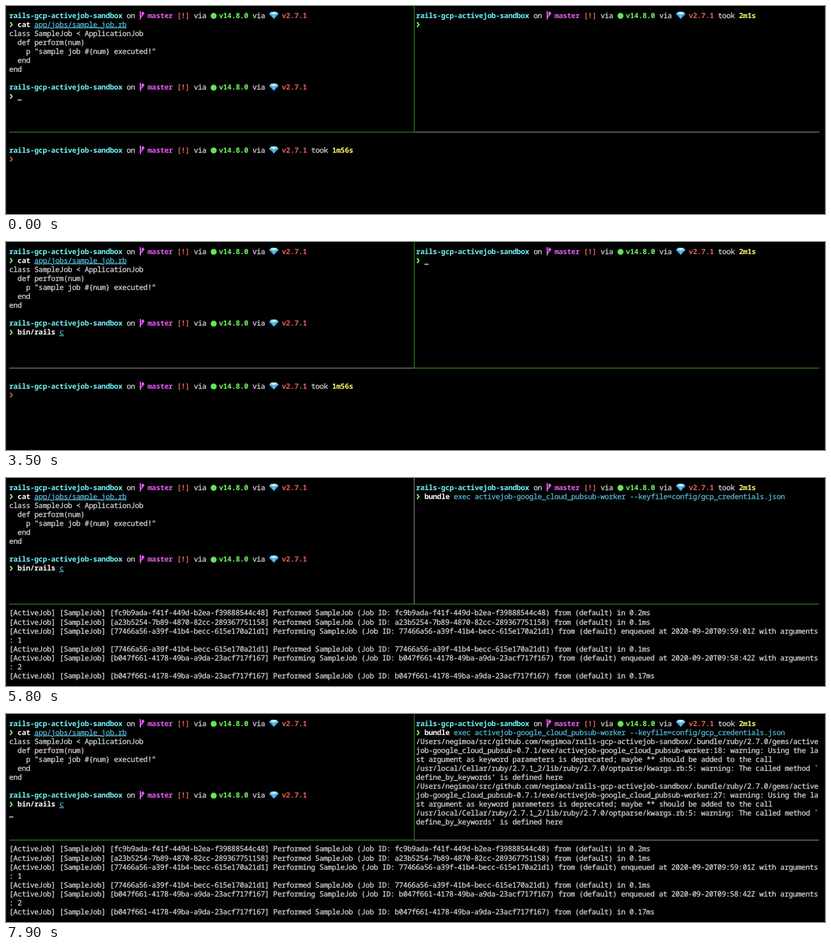
Animation, 1280 px wide and 326 px high, one loop 8000 ms. Source, as an HTML page:

```html
<!DOCTYPE html>
<html lang="en">
<head>
<meta charset="utf-8">
<title>Terminal panes</title>
<style>
  html, body { margin: 0; width: 100%; height: 100%; overflow: hidden; background: #000; }
  svg { display: block; width: 100%; height: 100%; }
  text {
    font: 11.4px "Noto Sans Mono", "DejaVu Sans Mono", monospace;
    letter-spacing: calc(6.555px - .6em);
    color: #d4d4d4;
    fill: currentColor;
    stroke: currentColor;
    stroke-width: .3px;
    white-space: pre;
    text-rendering: geometricPrecision;
  }
  .b { font-weight: 700; stroke: none; }
  .u { text-decoration: underline; }
  .white { color: #fff; }
  .aqua { color: #74f5fa; }
  .teal { color: #55bad6; }
  .pink { color: #e65cf2; }
  .red { color: #e65f5a; }
  .green { color: #6cf45f; }
  .yellow { color: #fbf86a; }
</style>
</head>
<body>
<svg id="stage" viewBox="0 0 1280 326" preserveAspectRatio="none"></svg>
<script>
const LOOP = 8000;
const CELL_W = 6.555, CELL_H = 14.06, LEFT = 5, BASE = 18.6;
const RIGHT_COL = 97, BOTTOM_ROW = 14;
const stage = document.getElementById('stage');
const colX = c => LEFT + c * CELL_W;
const rowY = r => BASE + r * CELL_H;

function add(tag, attrs, parent = stage) {
  const el = document.createElementNS('http://www.w3.org/2000/svg', tag);
  for (const k in attrs) el.setAttribute(k, attrs[k]);
  return parent.appendChild(el);
}

function write(col, row, str, cls = '', parent = stage) {
  const el = add('text', { x: colX(col), y: rowY(row), class: cls }, parent);
  el.textContent = str;
  return el;
}

function writeLines(col, row, lines, parent) {
  lines.forEach((line, i) => {
    const str = line.trimStart();
    if (str) write(col + line.length - str.length, row + i, str, '', parent);
  });
}

function chevron(col, row, color, parent) {
  const x = colX(col) + 1.6, y = rowY(row) - 3.5;
  add('path', { d: `M${x} ${y - 3.8}l2.9 3.8l-2.9 3.8`, fill: 'none', stroke: color, 'stroke-width': 2 }, parent);
}

function branch(col, row, parent) {
  const x = colX(col), y = rowY(row);
  add('path', {
    d: `M${x + 1.8} ${y - 10.5}v13M${x + 5.7} ${y - 8.5}v3.6l-3.6 3.6M${x + 3.7} ${y - 6}l2-2.8l2 2.8`,
    fill: 'none', stroke: '#e65cf2', 'stroke-width': 1.9
  }, parent);
}

function gem(col, row, parent) {
  const g = add('g', { transform: `translate(${colX(col)} ${rowY(row) - 9.3})` }, parent);
  const facet = (points, fill) => add('polygon', { points, fill }, g);
  facet('3,0 11.5,0 14.4,3.8 7.2,11 0,3.8', '#3f9fdc');
  facet('3,0 11.5,0 14.4,3.8 0,3.8', '#8fd3f3');
  facet('5.4,0 9,0 10,3.8 4.4,3.8', '#c9ecfb');
  facet('4.4,3.8 10,3.8 7.2,11', '#62bdec');
}

function prompt(col, row, took, mark = '#7df56c', parent = stage) {
  const put = (c, str, cls) => write(col + c, row, str, cls, parent);
  put(0, 'rails-gcp-activejob-sandbox', 'b aqua');
  put(28, 'on');
  branch(col + 31, row, parent);
  put(33, 'master', 'b pink');
  put(40, '[!]', 'b red');
  put(44, 'via');
  add('circle', { cx: colX(col + 48) + 4.9, cy: rowY(row) - 3.1, r: 4.7, fill: '#62e556' }, parent);
  put(50, 'v14.8.0', 'b green');
  put(58, 'via');
  gem(col + 62, row, parent);
  put(65, 'v2.7.1', 'b red');
  if (took) {
    put(72, 'took');
    put(77, took, 'b yellow');
  }
  chevron(col, row + 1, mark, parent);
}

// A command line made of styled runs; returns a setter for the number of typed characters.
function command(col, row, runs) {
  let at = 0;
  const parts = runs.map(([str, cls]) => {
    const part = { str, at, el: write(col + at, row, '', cls) };
    at += str.length + 1;
    return part;
  });
  const type = n => parts.forEach(p => {
    const shown = p.str.slice(0, Math.max(0, n - p.at));
    if (p.el.textContent !== shown) p.el.textContent = shown;
  });
  return { type, length: at - 1 };
}

// Window edges and pane borders
for (const x of [0, 1279]) add('rect', { x, y: 0, width: 1, height: 326, fill: '#14142c' });
const border = (x, y, width, height) => add('rect', { x, y, width, height });
const vLine = border(637.5, 0, 1.2, 197);
const hLeft = border(5, 197, 633, 1.2);
const hRight = border(638, 197, 633, 1.2);

// Left pane
prompt(0, 0);
command(2, 1, [['cat', 'b white'], ['app/jobs/sample_job.rb', 'teal u']]).type(99);
writeLines(0, 2, [
  'class SampleJob < ApplicationJob',
  '  def perform(num)',
  '    p "sample job #{num} executed!"',
  '  end',
  'end'
]);
prompt(0, 8);
const consoleCmd = command(2, 9, [['bin/rails', 'b white'], ['c', 'teal u']]);

// Right pane
prompt(RIGHT_COL, 0, '2m1s');
const workerCmd = command(RIGHT_COL + 2, 1, [
  ['bundle', 'b white'],
  ['exec activejob-google_cloud_pubsub-worker --keyfile=config/gcp_credentials.json', 'teal']
]);
const warnings = add('g', {});
const warning = line => [
  '/Users/negimoa/src/github.com/negimoa/rails-gcp-activejob-sandbox/.bundle/ruby/2.7.0/gems/active',
  `job-google_cloud_pubsub-0.7.1/exe/activejob-google_cloud_pubsub-worker:${line}: warning: Using the la`,
  'st argument as keyword parameters is deprecated; maybe ** should be added to the call',
  '/usr/local/Cellar/ruby/2.7.1_2/lib/ruby/2.7.0/optparse/kwargs.rb:5: warning: The called method `',
  "define_by_keywords' is defined here"
];
writeLines(RIGHT_COL, 2, [...warning(18), ...warning(27)], warnings);

// Bottom pane
const shell = add('g', {});
prompt(0, BOTTOM_ROW + 1, '1m56s', '#e0503f', shell);
const log = add('g', {});
const entry = (verb, id, tail) =>
  `[ActiveJob] [SampleJob] [${id}] ${verb} SampleJob (Job ID: ${id}) from (default) ${tail}`;
const done = (id, ms) => entry('Performed', id, `in ${ms}ms`);
const begun = (id, time) => entry('Performing', id, `enqueued at 2020-09-20T${time}Z with arguments`);
const jobs = [
  'fc9b9ada-f41f-449d-b2ea-f39888544c48',
  'a23b5254-7b89-4870-82cc-289367751158',
  '77466a56-a39f-41b4-becc-615e170a21d1',
  'b047f661-4178-49ba-a9da-23acf717f167'
];
writeLines(0, BOTTOM_ROW, [
  done(jobs[0], 0.2),
  done(jobs[1], 0.1),
  begun(jobs[2], '09:59:01'),
  ': 1',
  done(jobs[2], 0.1),
  begun(jobs[3], '09:58:42'),
  ': 2',
  done(jobs[3], 0.17)
], log);

const cursor = add('rect', { width: 6.5, height: 1.4, fill: '#e4e4e4' });

const FOCUS = [[0, 'left'], [3000, 'right'], [4700, 'bottom'], [6400, 'right'], [6600, 'left']];
const LOG_AT = 5600, WARN_AT = 6600, CONSOLE_AT = 6700;

const typed = (t, from, to, len) =>
  Math.round(len * Math.min(1, Math.max(0, (t - from) / (to - from))));
const show = (el, on) => el.setAttribute('visibility', on ? 'visible' : 'hidden');
const tint = (el, on) => el.setAttribute('fill', on ? '#2b8c16' : '#858585');

function draw(t) {
  const focus = FOCUS.filter(([at]) => at <= t).pop()[1];
  const n = typed(t, 1500, 2700, consoleCmd.length);
  const m = typed(t, 3700, 4500, workerCmd.length);
  consoleCmd.type(n);
  workerCmd.type(m);

  show(shell, t < LOG_AT);
  show(log, t >= LOG_AT);
  show(warnings, t >= WARN_AT);

  tint(vLine, focus !== 'bottom');
  tint(hLeft, focus !== 'right');
  tint(hRight, focus !== 'left');

  const [col, row] = {
    left: t < CONSOLE_AT ? [2 + n, 9] : [0, 10],
    right: [RIGHT_COL + 2 + m, 1],
    bottom: t < LOG_AT ? [2, BOTTOM_ROW + 2] : [0, BOTTOM_ROW + 8]
  }[focus];
  cursor.setAttribute('x', colX(col));
  cursor.setAttribute('y', rowY(row) + 1.5);
}

function tick() {
  draw(performance.now() % LOOP);
  requestAnimationFrame(tick);
}
tick();
</script>
</body>
</html>
```
